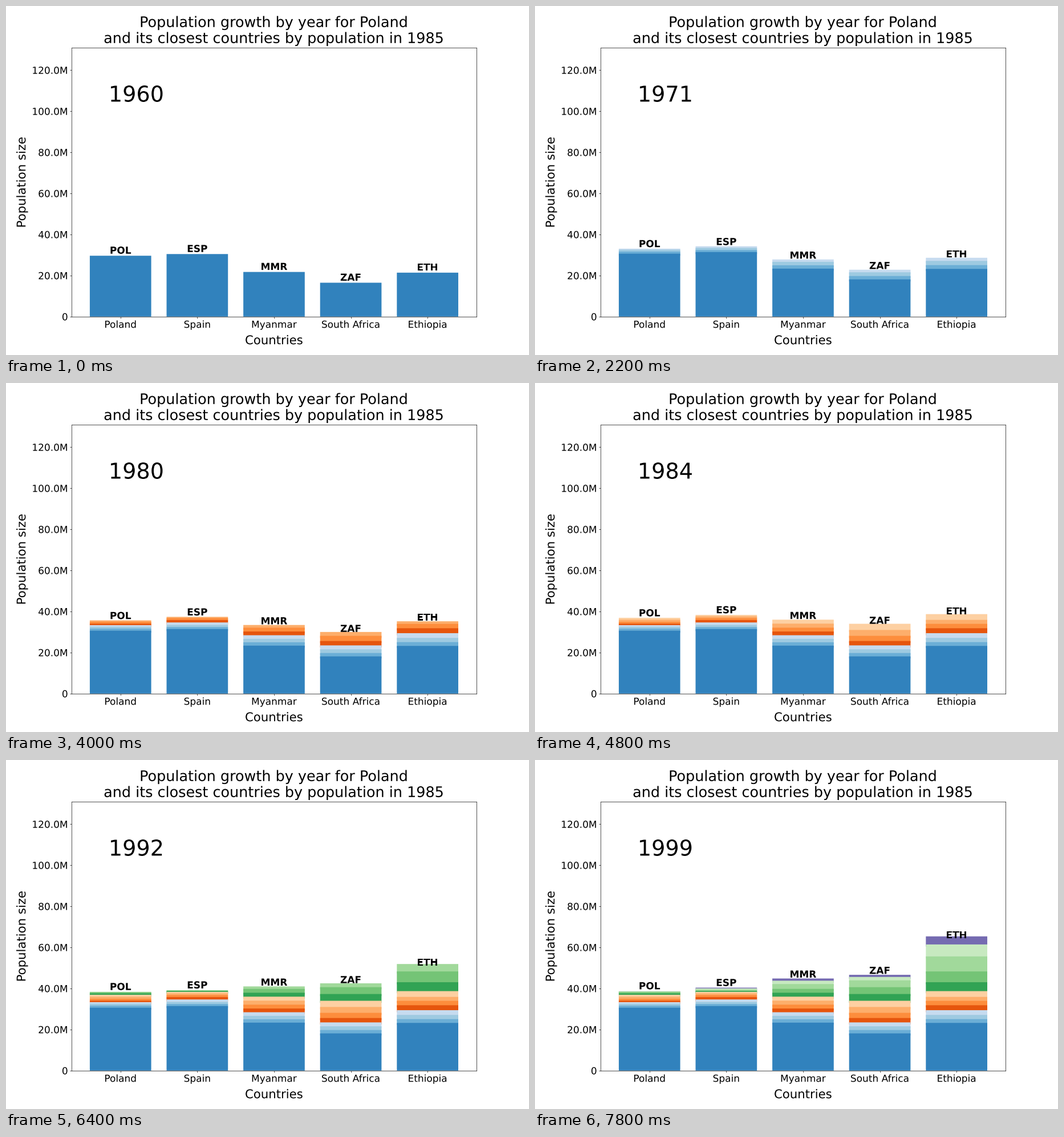
These frames come from a looping animation (917 by 611 pixels, 8 s). A matplotlib script:

```python
import matplotlib.pyplot as plt
import numpy as np
from matplotlib.animation import FuncAnimation
from matplotlib.patheffects import Normal
from matplotlib.text import Text

DPI = 64
K = 61.1 / DPI            # scale for point sizes
START, YEARS = 1960, 40
SPAN = 62                 # years shared out over the 20 colours
STEP = 8                  # years between key populations
OVERLAP = 1               # hides seams between stacked bands

# code, then millions in 1960, 1968, ... 2000
COUNTRIES = {
    "Poland": ("POL", [29.64, 32.29, 34.36, 36.91, 38.36, 38.66]),
    "Spain": ("ESP", [30.46, 33.1, 36.14, 38.33, 39.16, 40.57]),
    "Myanmar": ("MMR", [21.74, 26.1, 30.85, 36.0, 41.0, 45.4]),
    "South Africa": ("ZAF", [16.5, 20.95, 26.4, 34.0, 42.5, 47.2]),
    "Ethiopia": ("ETH", [21.4, 26.4, 32.6, 38.7, 51.9, 67.3]),
}


def smooth(keys, u):
    """Cubic Hermite curve through evenly spaced keys."""
    p = np.array(keys)
    m = np.gradient(p)
    k = np.minimum(u.astype(int), len(p) - 2)
    t = u - k
    ease = t * t * (3 - 2 * t)
    return (p[k] + (p[k + 1] - p[k]) * ease
            + t * (1 - t) * (m[k] * (1 - t) - m[k + 1] * t))


years = np.arange(YEARS)
pop = np.array([smooth(keys, years / STEP) for _, keys in COUNTRIES.values()])
xs = range(len(pop))
band = years * 20 // SPAN
band_end = [years[band == b][-1] for b in range(band[-1] + 1)]

plt.rcParams.update({
    "font.family": "DejaVu Sans",
    "text.hinting": "none",
    "axes.linewidth": 0.8 * K,
})

fig, ax = plt.subplots(figsize=(917 / DPI, 611 / DPI), dpi=DPI)
fig.subplots_adjust(left=0.125, right=0.9, bottom=0.11, top=0.88)
ax.set_xlim(-0.64, 4.64)
ax.set_ylim(0, 130.84)
ax.set_title("Population growth by year for Poland\n"
             "and its closest countries by population in 1985",
             fontsize=30 * K, pad=10 * K)
ax.set_xlabel("Countries", fontsize=25 * K, labelpad=11 * K)
ax.set_ylabel("Population size", fontsize=25 * K, labelpad=8 * K)
ax.set_xticks(xs, COUNTRIES)
ticks = range(0, 121, 20)
ax.set_yticks(ticks, [f"{t:.1f}M" if t else "0" for t in ticks])
ax.tick_params(labelsize=20 * K, length=3.5 * K, width=0.8 * K, pad=3.5 * K)
ax.tick_params(axis="x", pad=4.3 * K)

colors = plt.get_cmap("tab20c").colors
layers = []
for b, color in enumerate(colors[:len(band_end)]):
    base = pop[:, band_end[b - 1]] - OVERLAP if b else 0
    layers.append(ax.bar(xs, 0, 0.8, base, color=color, linewidth=0,
                         snap=False, zorder=2 - 0.05 * b))
labels = [ax.text(x, 0, code, ha="center", va="bottom",
                  fontsize=20 * K, fontweight="bold", zorder=4)
          for x, (code, _) in enumerate(COUNTRIES.values())]
year_text = ax.text(0.16, 0.8, "", fontsize=45 * K, ha="center",
                    transform=ax.transAxes)

# drawn as outlines, text keeps its exact position between pixels
for text in fig.findobj(Text):
    text.set_path_effects([Normal()])


def update(i):
    for b, layer in enumerate(layers):
        tops = pop[:, min(i, band_end[b])]
        for rect, top in zip(layer, tops):
            rect.set_height(top - rect.get_y())
            rect.set_visible(b <= band[i])
    # labels rest on the height of the year before
    for x, label in enumerate(labels):
        label.set_y(pop[x, max(i - 1, 0)])
    year_text.set_text(str(START + i))
    return [year_text, *labels]


anim = FuncAnimation(fig, update, frames=YEARS, interval=200,
                     repeat=True, repeat_delay=0, blit=False)
plt.show()
```
